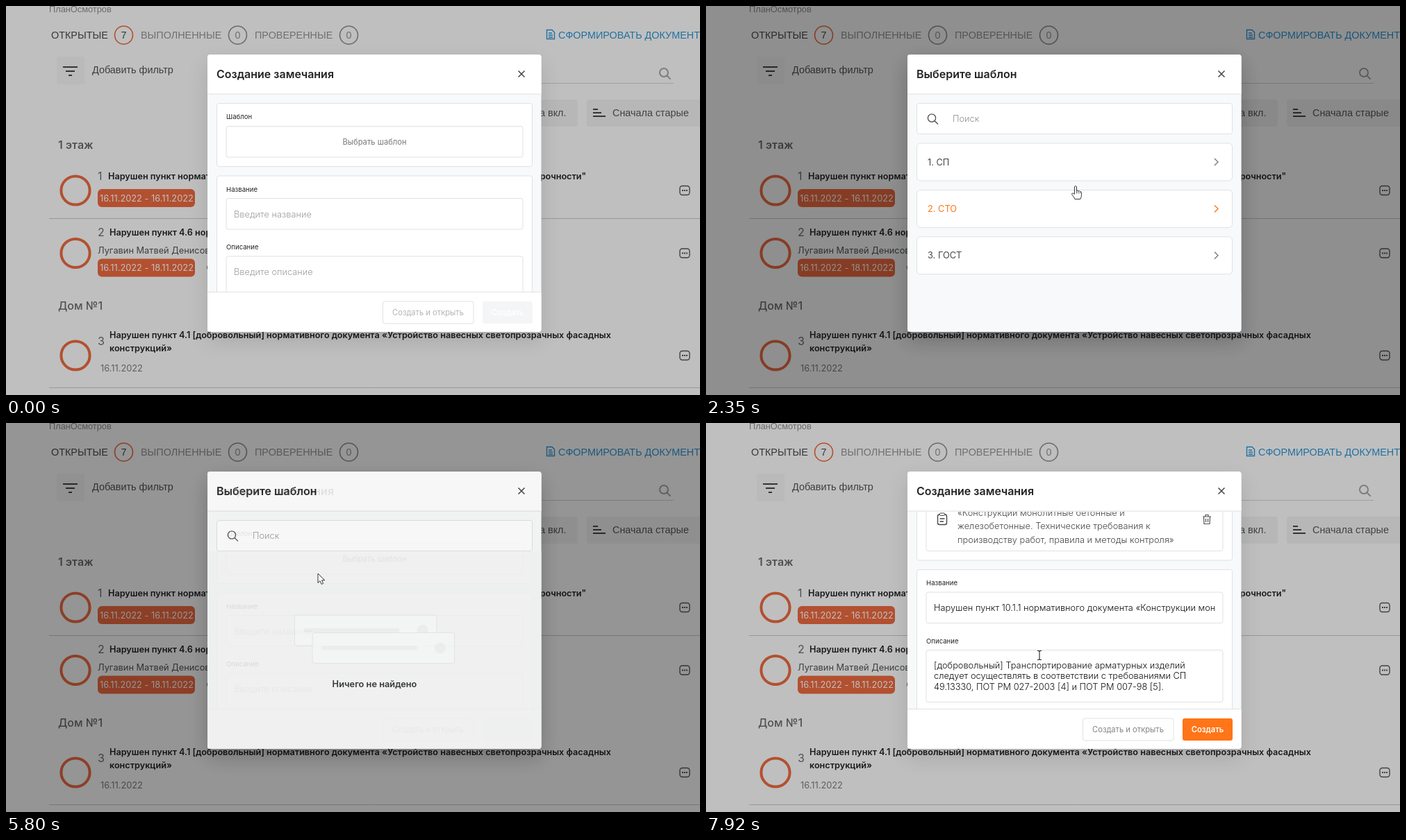
Write an HTML page with a canvas that moves like this. It is 999 px wide and 561 px high and loops after 7.95 s.

```html
<!DOCTYPE html>
<html lang="ru">
<head>
<meta charset="utf-8">
<title>Создание замечания</title>
<style>
html, body { margin: 0; width: 100%; height: 100%; overflow: hidden; background: #bfbfbf; }
canvas { display: block; }
</style>
</head>
<body>
<canvas id="stage" width="999" height="561"></canvas>
<script>
const W = 999, H = 561, LOOP = 7950;
const INTER = 'Inter, "Open Sans", sans-serif';
const ARIAL = '"Liberation Sans", Arial, sans-serif';
const ORANGE = '#ee6a40', INK = '#222326', LINE = '#dfe1e2';

const stage = document.getElementById('stage').getContext('2d');
const newLayer = () => Object.assign(document.createElement('canvas'), { width: W, height: H }).getContext('2d');
let g = stage;

const clamp = v => Math.max(0, Math.min(1, v));
const span = (t, from, to) => clamp((t - from) / (to - from));
const smooth = p => p * p * (3 - 2 * p);
const mix = (a, b, p) => a + (b - a) * p;
const mixRgb = (a, b, p) => `rgb(${a.map((v, i) => Math.round(mix(v, b[i], p)))})`;

// Text is placed by the middle of its capital letters.
function text(str, x, cy, size, color, weight = 400, family = INTER, align = 'left') {
  g.font = `${weight} ${size}px ${family}`;
  g.fillStyle = color;
  g.textAlign = align;
  g.fillText(str, x, cy + size * 0.36);
}

function box(x, y, w, h, r, fill, stroke) {
  g.beginPath();
  g.roundRect(x, y, w, h, r);
  if (fill) { g.fillStyle = fill; g.fill(); }
  if (stroke) { g.strokeStyle = stroke; g.lineWidth = 1; g.stroke(); }
}

function ring(x, y, r, color, width) {
  g.beginPath();
  g.arc(x, y, r, 0, Math.PI * 2);
  g.strokeStyle = color;
  g.lineWidth = width;
  g.stroke();
}

function strokePath(d, x, y, color, width) {
  g.save();
  g.translate(x, y);
  g.strokeStyle = color;
  g.lineWidth = width;
  g.stroke(new Path2D(d));
  g.restore();
}

function rule(x1, x2, y, color, width = 1) {
  strokePath(`M${x1} ${y}H${x2}`, 0, 0, color, width);
}

function magnifier(x, y, r, color, width) {
  ring(x, y, r, color, width);
  strokePath(`M${r * 0.72} ${r * 0.72}L${r * 1.6} ${r * 1.6}`, x, y, color, width);
}

function menuIcon(y) {
  g.beginPath();
  g.roundRect(970, y - 6.5, 14, 13, 3.5);
  g.strokeStyle = '#55575a';
  g.lineWidth = 1.4;
  g.stroke();
  g.fillStyle = '#55575a';
  for (const x of [973, 976, 979]) g.fillRect(x, y - 1, 2, 2);
}

function tab(label, x, count, cx, color, accent) {
  text(label, x, 42, 14.4, color, 400, ARIAL);
  ring(cx, 42, 13, accent, 1.6);
  text(count, cx, 42, 14.4, color, 400, ARIAL, 'center');
}

function badge(str, y) {
  box(132, y, 140, 26, 6, ORANGE);
  text(str, 135, y + 13.3, 12.8, '#fff');
}

function itemTitle(str, x, y, align) {
  text(str, x, y, 12.65, INK, 600, INTER, align);
}

function drawPage() {
  g.fillStyle = '#fff';
  g.fillRect(0, 0, W, H);
  text('ПланОсмотров', 62, 4, 12.8, '#8b8d90', 400, ARIAL);
  tab('ОТКРЫТЫЕ', 65, '7', 169.5, '#48494c', ORANGE);
  tab('ВЫПОЛНЕННЫЕ', 194, '0', 333.5, '#929497', '#8d8f92');
  tab('ПРОВЕРЕННЫЕ', 358, '0', 493.5, '#929497', '#8d8f92');

  strokePath('M-5.5 -6.5H2L5.5 -3V6.5H-5.5ZM-3 -2H2M-3 1H3M-3 4H3', 784, 41, '#2b95d6', 1.4);
  text('СФОРМИРОВАТЬ ДОКУМЕНТ', 795, 42, 14.4, '#2b95d6', 400, ARIAL);

  box(73, 73, 40, 40, 3, '#f8f8f8');
  rule(82, 103, 88, '#444649', 2);
  rule(86, 99, 94, '#444649', 2);
  rule(90, 95, 100, '#444649', 2);
  text('Добавить фильтр', 124, 92, 14.4, '#505255', 400, ARIAL);
  rule(600, 961, 111.5, '#d4d5d6');
  magnifier(947, 96, 6, '#a3a5a7', 2);

  box(640, 135, 183, 39, 3, '#f4f4f4');
  text('а вкл.', 768, 154, 14.4, '#55575a', 400, ARIAL);
  box(836, 135, 180, 39, 3, '#f4f4f4');
  rule(845, 852, 149, '#444649', 2);
  rule(845, 857, 154, '#444649', 2);
  rule(845, 863, 159, '#444649', 2);
  text('Сначала старые', 873, 154, 14.4, '#55575a', 400, ARIAL);

  text('1 этаж', 75, 200, 16, '#6a6c6f', 600);
  text('Дом №1', 75, 432, 16, '#6a6c6f', 500);
  for (const y of [266, 356.5, 504]) {
    ring(100, y, 20.6, ORANGE, 4);
    menuIcon(y);
  }
  [['1', 245], ['2', 326], ['3', 483]].forEach(([n, y]) => text(n, 132, y, 16, '#6a6c6f'));

  itemTitle('Нарушен пункт нормативного', 147, 245);
  itemTitle('прочности"', 835, 245, 'right');
  badge('16.11.2022 - 16.11.2022', 264);
  rule(62, W, 306.5, '#c9cacb');

  itemTitle('Нарушен пункт 4.6 нормативного', 149, 326);
  text('Лугавин Матвей Денисович', 132, 352, 12.8, '#505255');
  badge('16.11.2022 - 18.11.2022', 364.5);
  ring(294, 377, 4.5, '#6a6c6f', 1.2);

  itemTitle('Нарушен пункт 4.1 [добровольный] нормативного документа «Устройство навесных светопрозрачных фасадных', 149, 474);
  itemTitle('конструкций»', 149, 493);
  text('16.11.2022', 136, 522, 12.8, '#7c7e81');
  rule(62, W, 550.5, '#c9cacb');
}

function dim(amount) {
  g.fillStyle = `rgba(0,0,0,${0.25 * amount})`;
  g.fillRect(0, 0, W, H);
}

// Panel and header; leaves the clip on the panel.
function openPanel(title, withBack) {
  g.save();
  g.shadowColor = 'rgba(0,0,0,.12)';
  g.shadowBlur = 30;
  g.shadowOffsetY = 12;
  box(290, 70, 480.5, 400, 4, '#f8f9fa');
  g.shadowColor = 'transparent';
  g.clip();
  g.fillStyle = '#fff';
  g.fillRect(290, 70, 481, 57);
  rule(290, 771, 127, LINE);
  if (withBack) strokePath('M6.5 0H-6M-1.5 -4.5L-6 0L-1.5 4.5', 319, 98, '#505255', 1.4);
  text(title, withBack ? 351 : 303, 98, 16, INK, 600);
  strokePath('M-4.5 -4.5L4.5 4.5M4.5 -4.5L-4.5 4.5', 742, 98, '#44464a', 1.5);
}

function clipBody(bottom) {
  g.beginPath();
  g.rect(290, 128, 481, bottom - 128);
  g.clip();
}

function drawTemplate() {
  const lines = [
    'Нарушен пункт 10.1.1 нормативного документа',
    '«Конструкции монолитные бетонные и',
    'железобетонные. Технические требования к',
    'производству работ, правила и методы контроля»'
  ];
  lines.forEach((s, i) => text(s, 362, 190 + i * 19.3, 12.8, '#44464a', 300));
  g.beginPath();
  g.roundRect(333.5, 212, 13, 14.5, 2.5);
  g.strokeStyle = '#44464a';
  g.lineWidth = 1.4;
  g.stroke();
  box(336.5, 210, 7, 3.5, 1, '#fff', '#44464a');
  strokePath('M-3.5 -1H3.5M-3.5 3H2', 340, 219, '#44464a', 1.3);
  strokePath('M-6 -4H6M-2 -4V-6.5H2V-4M-4.5 -4L-4 6.5H4L4.5 -4M-1.5 -1V4M1.5 -1V4', 721, 219, '#505255', 1.2);
}

function drawForm(t) {
  const filled = t >= 5960;
  const shift = filled ? 46.5 : 0;
  const scroll = Math.round(80 * smooth(span(t, 7640, 7920)));
  openPanel('Создание замечания', false);

  g.save();
  clipBody(412);
  g.translate(0, -scroll);
  box(303.5, 140.5, 454, 91 + shift, 3, '#fff', LINE);
  text('Шаблон', 317, 160, 9.6, INK);
  const pressed = t >= 1590 && t < 2070;
  box(317, 173.5, 427, 44.5 + shift, 3, pressed ? '#f0f1fa' : '#fff', LINE);
  if (filled) drawTemplate();
  else text('Выбрать шаблон', 530.5, 195.5, 11.2, '#77797c', 400, INTER, 'center');

  g.translate(0, shift);
  box(303.5, 245, 454, 270, 3, '#fff', LINE);
  text('Название', 317, 264.5, 9.6, INK);
  box(317, 277.5, 427, 44.5, 3, '#fff', LINE);
  text('Описание', 317, 348, 9.6, INK);
  box(317, 361, 427, 75, 3, '#fff', LINE);
  if (filled) {
    const lines = [
      '[добровольный] Транспортирование арматурных изделий',
      'следует осуществлять в соответствии с требованиями СП',
      '49.13330, ПОТ РМ 027-2003 [4] и ПОТ РМ 007-98 [5].'
    ];
    lines.forEach((s, i) => text(s, 328, 383 + i * 15.2, 12.8, '#111', 300));
    g.save();
    g.beginPath();
    g.rect(328, 278, 405, 44);
    g.clip();
    text('Нарушен пункт 10.1.1 нормативного документа «Конструкции монолитные бетонные', 328, 300, 12.8, '#111', 300);
    g.restore();
  } else {
    text('Введите название', 328, 300, 12.8, '#9b9da0', 300);
    text('Введите описание', 328, 383, 12.8, '#9b9da0', 300);
  }
  g.restore();

  g.fillStyle = '#fff';
  g.fillRect(290, 412, 481, 59);
  rule(290, 771, 412.5, LINE);
  box(542.5, 426, 130.5, 32, 3, '#fff', LINE);
  text('Создать и открыть', 607.5, 442, 11.2, filled ? '#838588' : '#b3b5b7', 400, INTER, 'center');
  const ready = span(t, 6450, 6650);
  const off = filled ? [223, 224, 224] : [244, 245, 246];
  box(686, 426, 72, 32, 3, mixRgb(off, [255, 117, 24], ready));
  text('Создать', 722, 442, 11.2, '#fff', 600, INTER, 'center');
  g.restore();
}

const LISTS = [
  ['1. СП', '2. СТО', '3. ГОСТ'],
  ['Конструкции монолитные бетонные и железобетонные…', 'Устройство навесных светопрозрачных фасадных…',
    'Системы фасадные. Правила и контроль работ', 'Кровли. Требования к производству работ'],
  ['Нарушен пункт 10.1.1 нормативного документа…', 'Нарушен пункт 10.1.2 нормативного документа…',
    'Нарушен пункт 10.2.1 нормативного документа…', 'Нарушен пункт 10.2.2 нормативного документа…']
];
const rowTop = i => 198 + i * 67.4;

function drawList(level, hover) {
  LISTS[level].forEach((s, i) => {
    const y = rowTop(i), on = i === hover;
    box(303.5, y, 454, 54, 5, '#fff', LINE);
    text(s, 319, y + 27, 12.8, on ? '#ff7518' : '#44464a');
    if (level < 2) strokePath('M-3 -5L2 0L-3 5', 735, y + 27, on ? '#ff7518' : '#77797c', 1.4);
  });
}

function drawSkeleton() {
  for (let i = 0; i < 5; i++) box(303, rowTop(i), 455, 54.5, 6, '#dddfde');
}

function emptyCard(x, y) {
  box(x, y, 204.5, 44, 3, '#fafbfb', '#e6e8e8');
  box(x + 13, y + 19, 138, 6, 3, '#f1f3f3');
  g.beginPath();
  g.arc(x + 184, y + 22, 8, 0, Math.PI * 2);
  g.fillStyle = '#f1f3f3';
  g.fill();
}

function drawEmpty() {
  g.fillStyle = '#f5f7f6';
  g.fillRect(290, 185, 481, 285);
  emptyCard(415.5, 277);
  emptyCard(441, 302.5);
  text('Ничего не найдено', 530.5, 376, 12.8, INK, 600, INTER, 'center');
}

function drawPicker(t) {
  const reset = t >= 5680;
  const level = reset || t < 3210 ? 0 : t < 4840 ? 1 : 2;
  const title = ['Выберите шаблон', '2. СТО', 'Конструкции монолитные бетонные и...'][level];
  openPanel(title, level > 0);
  clipBody(470);
  box(303.5, 140.5, 454, 44, 3, '#fff', LINE);
  magnifier(325, 161.5, 5.6, '#505255', 1.4);
  text('Поиск', 355, 162, 12.8, '#8d8f92', 300);

  if (reset || t < 1850) drawEmpty();
  else if (t < 2030) drawSkeleton();
  else if (t < 3420) drawList(0, t >= 2320 ? 1 : -1);
  else if (t < 3720) drawSkeleton();
  else if (t < 4840) drawList(1, t >= 4400 ? 0 : -1);
  else if (t < 5200) drawSkeleton();
  else drawList(2, t >= 5480 ? 0 : -1);
  g.restore();
}

// time, x, y, shape
const POINTER = [
  [40, 868, 494, 'arrow'], [420, 690, 330, 'arrow'], [620, 570, 230, 'hand'], [820, 502, 184, 'hand'],
  [1000, 550, 200, 'hand'], [1150, 527, 190, 'hand'], [1290, 527, 189, 'hand'], [1450, 530, 199, 'hand'],
  [1590, 530, 199, 'arrow'], [1850, 530, 199, 'arrow'], [2070, 532, 257, 'arrow'], [2320, 532, 260, 'hand'],
  [2540, 531, 250, 'hand'], [2790, 530, 248, 'hand'], [3380, 530, 248, 'hand'], [3420, 532, 259, 'arrow'],
  [3800, 532, 259, 'arrow'], [4120, 545, 235, 'hand'], [4450, 525, 214, 'hand'], [4700, 523, 213, 'hand'],
  [4840, 545, 232, 'hand'], [4930, 615, 292, 'hand'], [5130, 800, 490, 'arrow'], [5520, 452, 220, 'hand'],
  [5650, 449, 217, 'hand'], [5680, 449, 217, 'arrow'], [5850, 449, 217, 'arrow'], [6100, 465, 226, 'hand'],
  [6390, 483, 227, 'hand'], [6440, 498, 229, 'hand'], [6650, 512, 236, 'hand'], [7020, 518, 238, 'hand'],
  [7160, 520, 285, 'arrow'], [7280, 505, 350, 'beam'], [7490, 480, 335, 'beam'], [7950, 480, 335, 'beam']
];
const ARROW = new Path2D('M0 0V13.5L3.1 10.7L5.2 15.5L7.6 14.4L5.6 9.8H9.8Z');
const HAND = new Path2D('M-1.5 1Q0 -.8 1.5 1V7Q3 6 4 7.5Q6 6.8 6.6 8.3Q8.5 7.8 8.6 10V13Q8.5 16 7 19H-1Q-2 16 -5.5 12Q-4.8 9.5 -2.6 11L-1.5 12Z');

function drawPointer(t) {
  if (t < POINTER[0][0]) return;
  const i = POINTER.findIndex(p => p[0] > t);
  const [t0, x0, y0, shape] = POINTER[i - 1];
  const [t1, x1, y1] = POINTER[i];
  const p = smooth(span(t, t0, t1));
  g.save();
  g.translate(mix(x0, x1, p), mix(y0, y1, p));
  if (shape === 'beam') {
    strokePath('M-3 -6.5H-1L0 -5.5L1 -6.5H3M0 -5.5V5.5M-3 6.5H-1L0 5.5L1 6.5H3', 0, 0, '#222', 1.1);
  } else {
    const path = shape === 'hand' ? HAND : ARROW;
    g.fillStyle = '#fff';
    g.fill(path);
    g.strokeStyle = '#333';
    g.lineWidth = 1;
    g.stroke(path);
    if (shape === 'hand') strokePath('M1.5 7V11M4 8V11M6.5 9V11', 0, 0, '#333', 0.8);
  }
  g.restore();
}

const page = newLayer(), picker = newLayer();
g = page;
drawPage();

function pickerAlpha(t) {
  const fadeIn = span(t, 1590, 1770), fadeOut = span(t, 5740, 5910);
  return fadeIn * (2 - fadeIn) * (1 - fadeOut * fadeOut);
}

function render(t) {
  g = stage;
  g.drawImage(page.canvas, 0, 0);
  dim(1);
  drawForm(t);
  const alpha = pickerAlpha(t);
  if (alpha > 0) {
    dim(alpha);
    g = picker;
    g.clearRect(0, 0, W, H);
    g.save();
    drawPicker(t);
    g.restore();
    g = stage;
    g.globalAlpha = alpha;
    g.drawImage(picker.canvas, 0, 0);
    g.globalAlpha = 1;
  }
  drawPointer(t);
}

const start = performance.now();
function tick() {
  render((performance.now() - start) % LOOP);
  requestAnimationFrame(tick);
}
tick();
</script>
</body>
</html>
```
